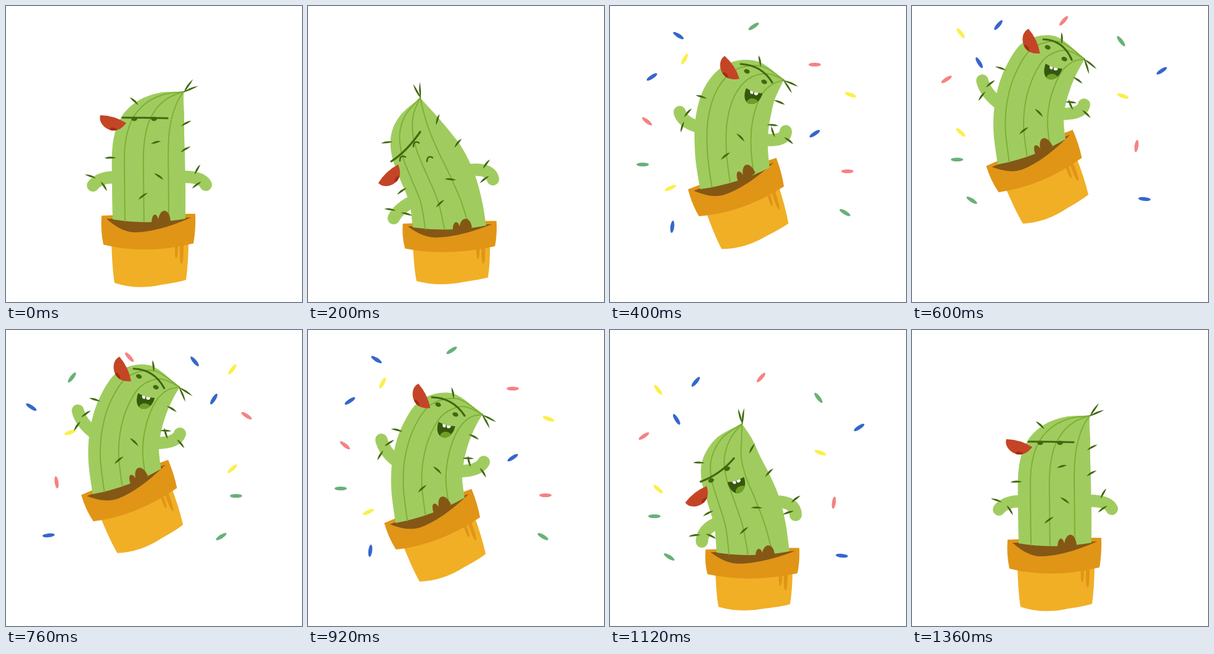
Write an HTML page with a canvas that moves like this. It is 480x480 px and loops after 2 s.

```html
<!DOCTYPE html>
<html lang="en">
<head>
<meta charset="utf-8">
<title>Jumping cactus</title>
<style>
  html, body { margin: 0; width: 100%; height: 100%; overflow: hidden; background: #fff; }
  canvas { display: block; width: 100vw; height: 100vh; }
</style>
</head>
<body>
<canvas id="stage"></canvas>
<script>
const SIZE = 480, LOOP = 2000, STEP = 40;
const canvas = document.getElementById('stage');
const ctx = canvas.getContext('2d');
const ratio = window.devicePixelRatio || 1;
canvas.width = canvas.height = SIZE * ratio;

const SKIN = '#a0cc5f', STRIPE = '#7eb036', SPINE = '#41690f', DARK = '#35590c';
const RIM = '#e09517', CLAY = '#f1af26', SOIL = '#855715', BEAK = '#c44526', BEAK_DARK = '#a52c17';
const BLUE = '#3567cc', GREEN = '#67b177', YELLOW = '#faf04a', PINK = '#f68282';

// pot: base corner, tilt, squash; left/right: edges from soil to tip;
// arms: shoulder, bend, hand; spines, mouth, beak: x, y, angle
const rest = {
  pot: [176, 449, 0, 1], turn: [0], tuft: [-37, 16],
  left: [173,346, 172,290, 173,225, 186,182, 212,155, 248,141, 288,139],
  right: [291,345, 291,295, 290,240, 289,205, 289,178, 288,157, 288,139],
  arms: [182,278, 153,276, 141,291, 284,277, 318,276, 324,290],
  spines: [208,154,45, 169,246,2, 292,190,-25, 291,232,-27, 248,276,38, 222,308,-33,
    137,276,22, 159,292,60, 310,265,-58, 309,290,-33],
  beak: [153, 177, 17], brow: [189,181, 225,181, 262,182],
  eyes: [208,183, 240,183, 0], mouth: [243, 221, -12]
};
const crouch = {
  pot: [176, 446, -0.8, 0.855], turn: [0.15], tuft: [-104, 13],
  left: [170,359, 164,318, 149,280, 136,243, 135,208, 150,177, 182,149],
  right: [289,356, 282,315, 270,272, 251,232, 228,201, 203,172, 182,149],
  arms: [176,314, 148,326, 139,344, 262,266, 296,263, 300,281],
  spines: [128,221,-3, 152,300,-32, 210,184,-70, 243,222,-48, 231,281,8, 214,320,-40,
    133,330,12, 160,337,18, 289,256,-50, 286,281,-35],
  beak: [114, 287, -43], brow: [135,252, 160,236, 182,204],
  eyes: [153,247, 175,224, -20], mouth: [197, 248, 0]
};
const leap = {
  pot: [181, 394, -18.5, 1], turn: [0], tuft: [42, 17],
  left: [146,297, 138,240, 139,180, 156,127, 192,93, 240,90, 282,120],
  right: [259,262, 256,232, 257,200, 262,172, 267,152, 274,136, 282,120],
  arms: [150,198, 117,190, 113,172, 250,217, 285,220, 285,203],
  spines: [243,89,83, 148,147,20, 275,156,25, 264,193,8, 212,213,48, 187,243,-35,
    126,173,-45, 117,196,-70, 264,204,-105, 290,218,40],
  beak: [186, 81, 57], brow: [212,94, 246,96, 263,124],
  eyes: [222,106, 250,123, 22], mouth: [234, 138, 16]
};
const peak = {
  pot: [180, 353, -21.6, 1], turn: [0], tuft: [57, 17],
  left: [139,257, 132,200, 136,148, 152,99, 182,58, 232,49, 280,86],
  right: [249,216, 246,187, 249,160, 256,136, 263,118, 271,102, 280,86],
  arms: [144,160, 119,142, 114,121, 240,175, 276,176, 279,160],
  spines: [243,52,92, 144,101,22, 269,120,38, 258,156,8, 206,173,48, 181,202,-35,
    127,126,-35, 113,146,-50, 257,160,-110, 283,175,46],
  beak: [189, 37, 65], brow: [213,54, 245,55, 259,87],
  eyes: [220,67, 247,86, 22], mouth: [230, 98, 15]
};
const fall = {
  pot: [181, 408, -20.2, 1], turn: [0], tuft: [46, 17],
  left: [142,313, 135,256, 138,204, 154,153, 185,112, 235,103, 283,137],
  right: [254,272, 250,240, 253,212, 259,188, 266,169, 274,152, 283,137],
  arms: [148,216, 124,199, 119,178, 244,229, 277,229, 285,214],
  spines: [235,102,82, 144,162,17, 269,173,30, 260,208,5, 210,227,45, 185,257,-38,
    132,183,-30, 117,203,-55, 261,213,-100, 284,231,60],
  beak: [179, 87, 64], brow: [201,109, 235,110, 254,139],
  eyes: [211,121, 239,137, 20], mouth: [225, 153, 12]
};
const land = {
  pot: [176, 449, 0, 0.853], turn: [0.16], tuft: [-93, 11],
  left: [173,361, 169,318, 157,276, 148,240, 151,208, 173,175, 214,152],
  right: [291,359, 285,315, 275,273, 260,237, 244,206, 230,176, 214,152],
  arms: [176,312, 150,322, 149,343, 270,278, 301,279, 301,300],
  spines: [144,215,5, 159,297,-25, 230,192,-58, 258,231,-43, 238,288,5, 217,325,-38,
    137,333,-5, 164,334,28, 301,274,-35, 289,296,-15],
  beak: [122, 280, -38], brow: [147,246, 179,234, 201,208],
  eyes: [164,244, 190,225, -22], mouth: [204, 243, -20]
};
const keys = [[0, rest], [200, crouch], [400, leap], [600, peak],
  [920, fall], [1120, land], [1360, rest], [LOOP, rest]];

// colour, x, y, angle
const burstA = [
  [BLUE,111,48,32], [GREEN,233,33,-33], [YELLOW,121,86,-62], [BLUE,68,115,-33],
  [PINK,60,187,38], [GREEN,53,257,0], [YELLOW,98,295,-25], [BLUE,101,358,-83],
  [PINK,332,95,0], [YELLOW,390,144,20], [BLUE,332,207,-33], [PINK,385,268,0], [GREEN,381,335,30]
];
const burstB = [
  [YELLOW,79,44,52], [BLUE,140,31,-50], [PINK,246,24,-48], [GREEN,339,57,52],
  [BLUE,109,92,58], [PINK,56,119,-33], [BLUE,405,105,-33], [YELLOW,342,146,20],
  [YELLOW,79,205,42], [GREEN,73,249,0], [PINK,364,227,-82], [BLUE,377,313,6], [GREEN,97,315,32]
];
const moved = (list, dx, dy) => list.map(([c, x, y, a]) => [c, x + dx, y + dy, a]);
const mirrored = list => list.map(([c, x, y, a]) => [c, 446 - x, y + 20, -a]);
// end time, pieces
const bursts = [[320, []], [520, burstA], [700, burstB], [880, mirrored(burstB)],
  [1060, burstA], [1160, moved(burstB, -1, 53)], [LOOP, []]];

const mix = (a, b, k) => a + (b - a) * k;
const rad = deg => deg * Math.PI / 180;
const lift = t => Math.max(0, 97.2 - 7.32e-4 * (t - 640) ** 2);

function poseAt(t) {
  let i = 0;
  while (t >= keys[i + 1][0]) i++;
  const [t0, a] = keys[i], [t1, b] = keys[i + 1];
  const s = (t - t0) / (t1 - t0), k = s * s * (3 - 2 * s);
  const pose = { dy: mix(lift(t0), lift(t1), k) - lift(t) };
  for (const part in a) pose[part] = a[part].map((v, n) => mix(v, b[part][n], k));
  return pose;
}

function fill(color, d) {
  ctx.fillStyle = color;
  ctx.fill(new Path2D(d));
}

function at(x, y, deg, draw) {
  ctx.save();
  ctx.translate(x, y);
  ctx.rotate(rad(deg));
  draw();
  ctx.restore();
}

function oval(color, x, y, rx, ry, deg = 0) {
  ctx.fillStyle = color;
  ctx.beginPath();
  ctx.ellipse(x, y, rx, ry, rad(deg), 0, 7);
  ctx.fill();
}

function leaf(x, y, deg, len = 19, w = 3) {
  const h = len / 2;
  at(x, y, deg, () => fill(SPINE, `M${-h} 1Q0 ${-w - 1} ${h} 0Q0 ${w - 0.5} ${-h} 1`));
}

function stroke(color, width, path) {
  ctx.strokeStyle = color;
  ctx.lineWidth = width;
  ctx.lineCap = 'round';
  ctx.stroke(new Path2D(path));
}

// smooth curve through flat x, y pairs, continuing from the first pair
function curve(p) {
  const n = p.length / 2 - 1;
  const pt = i => { i = Math.min(n, Math.max(0, i)); return [p[2 * i], p[2 * i + 1]]; };
  let d = '';
  for (let i = 0; i < n; i++) {
    const [a, b, c, e] = [pt(i - 1), pt(i), pt(i + 1), pt(i + 2)];
    d += `C${b[0] + (c[0] - a[0]) / 6} ${b[1] + (c[1] - a[1]) / 6} ` +
      `${c[0] - (e[0] - b[0]) / 6} ${c[1] - (e[1] - b[1]) / 6} ${c[0]} ${c[1]}`;
  }
  return d;
}

function inPot([x, y, tilt, squash], draw) {
  at(x, y, tilt, () => {
    ctx.scale(1, squash);
    ctx.translate(-176, -449);
    draw();
  });
}

function drawPot() {
  fill(CLAY, 'M171 380Q172 425 176 449Q212 461 252 452Q280 448 292 444Q296 415 296 378Z');
  fill(RIM, 'M274 386Q273 409 276 409Q279 409 279 386ZM282 386Q281 418 285 418Q288 416 288 386Z');
  fill(RIM, 'M155 340Q231 336 307 337Q308 362 304 385Q226 404 158 387Q153 364 155 340Z');
  fill(SOIL, 'M163 345Q186 366 207 367Q246 367 300 343Z');
}

function drawBody({ left, right, arms, pot, turn }) {
  const [a, b, c, d, e, f, g, h, i, j, k, l] = arms;
  stroke(SKIN, 20, `M${a} ${b}Q${c} ${d} ${e} ${f}M${g} ${h}Q${i} ${j} ${k} ${l}`);

  const down = [];
  for (let n = right.length - 2; n >= 0; n -= 2) down.push(right[n], right[n + 1]);
  const tilt = rad(pot[2]);
  const bx = (left[0] + right[0]) / 2 - 10 * Math.sin(tilt);
  const by = (left[1] + right[1]) / 2 + 10 * Math.cos(tilt);
  fill(SKIN, `M${left[0]} ${left[1]}${curve(left)}${curve(down)}Q${bx} ${by} ${left[0]} ${left[1]}Z`);

  for (const u of [0.17, 0.43, 0.77]) {
    const line = left.map((v, n) => {
      const bend = turn[0] * Math.sin(Math.PI * (n >> 1) / 6);
      return mix(v, right[n], u * (1 - bend));
    });
    line[1] += 3;
    stroke(STRIPE, 2, `M${line[0]} ${line[1]}${curve(line)}`);
  }
}

function drawSpines({ spines, left, tuft }) {
  for (let i = 0; i < spines.length; i += 3) leaf(spines[i], spines[i + 1], spines[i + 2]);
  for (const side of [-1, 1]) {
    const deg = tuft[0] + side * tuft[1];
    leaf(left[12] + 12 * Math.cos(rad(deg)), left[13] + 12 * Math.sin(rad(deg)), deg, 27, 2.8);
  }
}

function openMouth() {
  const shape = 'M-14 -1Q0 3 14 0C14 13 7 22 -2 22C-12 21 -15 10 -14 -1Z';
  fill(DARK, shape);
  ctx.clip(new Path2D(shape));
  oval('#709e27', 3, 20, 10, 8);
  fill('#fff', 'M-7 -1H-1V5Q-4 7 -6 4ZM0 0H7V4Q4 7 1 5Z');
}

function drawFace({ beak, brow, eyes, mouth }, t) {
  at(...beak, () => {
    const shape = 'M0 0C0 13 15 20 26 18C36 16 41 8 44 0Q22 -6 0 0Z';
    fill(BEAK, shape);
    ctx.clip(new Path2D(shape));
    oval(BEAK_DARK, 28, 17, 7, 4);
  });

  const closed = t > 80 && t < 280;
  const wink = (x, y) => stroke(SPINE, 2.5, `M${x - 4} ${y + 4}C${x - 4} ${y - 4} ${x + 1} ${y - 5} ${x + 5} ${y - 2}`);
  for (const i of [0, 2]) {
    if (closed) wink(eyes[i], eyes[i + 1]);
    else oval(SPINE, eyes[i], eyes[i + 1], 4.8, 3.4, eyes[4]);
  }

  if (closed) wink(mouth[0], mouth[1]);
  else if (t >= 280 && t < 1200) at(...mouth, openMouth);
  else leaf(...mouth, 17);

  const [a, b, c, d, e, f] = brow;
  stroke(SPINE, 3.2, `M${a} ${b}Q${c} ${d} ${e} ${f}`);
}

function render(t) {
  ctx.setTransform(ratio, 0, 0, ratio, 0, 0);
  ctx.fillStyle = '#fff';
  ctx.fillRect(0, 0, SIZE, SIZE);

  for (const [color, x, y, deg] of bursts.find(([end]) => t < end)[1]) oval(color, x, y, 10, 3.1, deg);

  const pose = poseAt(t);
  ctx.translate(0, pose.dy);
  inPot(pose.pot, drawPot);
  drawBody(pose);
  inPot(pose.pot, () =>
    fill(SOIL, 'M236 353C236 336 244 334 247 346C250 327 265 327 267 349Q252 357 236 353Z'));
  drawSpines(pose);
  drawFace(pose, t);
}

const start = performance.now();
function tick() {
  const t = (performance.now() - start) % LOOP;
  render(Math.floor(t / STEP) * STEP);
  requestAnimationFrame(tick);
}
tick();
</script>
</body>
</html>
```
